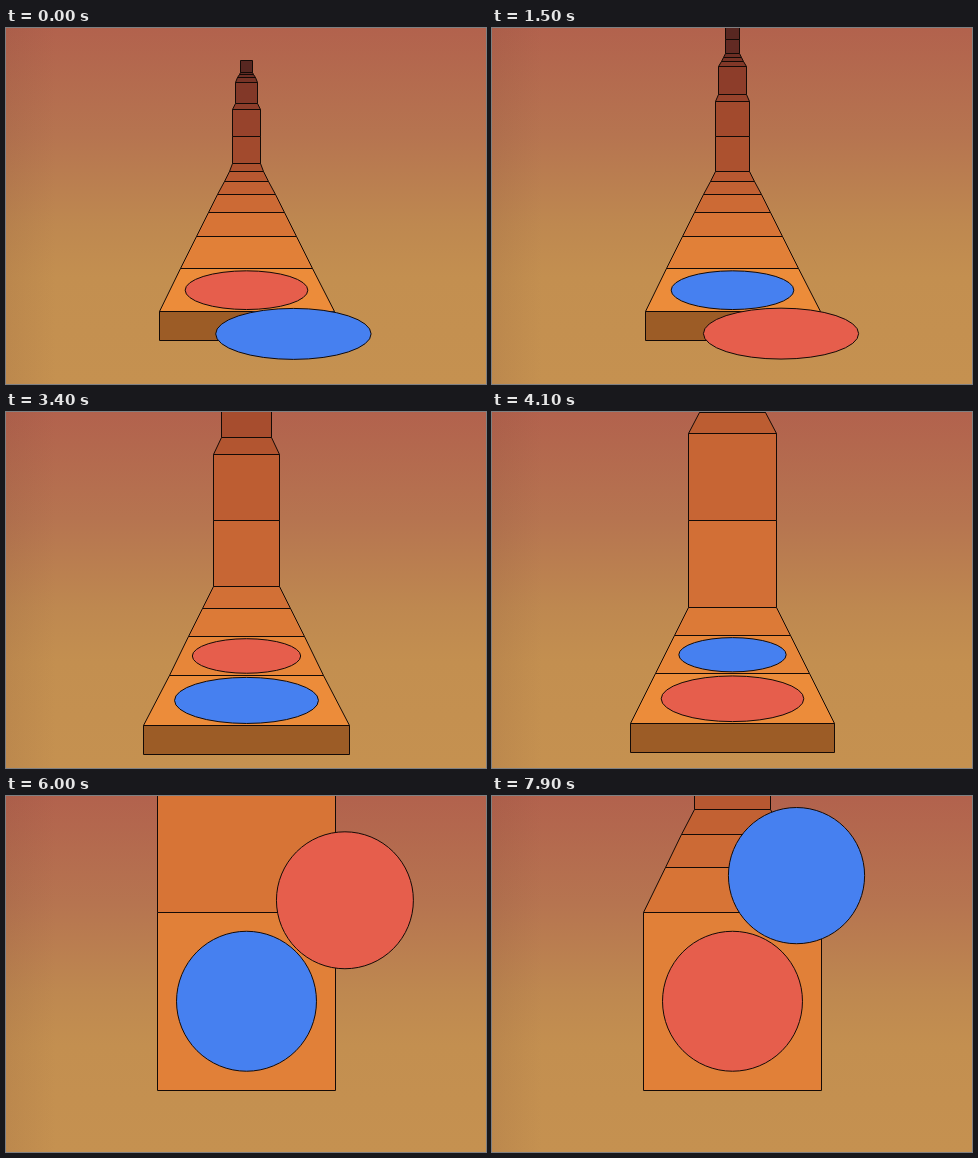
An HTML page with a canvas for the animation above (8000 ms loop, 480 by 356 pixels).

```html
<!DOCTYPE html>
<html lang="en">
<head>
<meta charset="utf-8">
<title>Orbit Tower</title>
<style>
html, body { margin: 0; width: 100%; height: 100%; overflow: hidden; background: #c49150; }
canvas { display: block; }
</style>
</head>
<body>
<canvas id="stage" width="480" height="356"></canvas>
<script>
const ctx = document.getElementById('stage').getContext('2d');
const W = 480, H = 356, CX = 240.5, LOOP = 8000, STEP = 100;
const PATH = 'FFFFFFFWWFWFFFWWFF';           // F: floor tile, W: wall tile
const LAND = [-353, 1147, 1847, 2519, 3240, 3950, 4816, 5516, 6060, 6622, 7260, 7960];
const MOVE = 300;                            // camera time after a landing
const START = 23;                            // orbit angle at time 0
const FLOOR = { y: 283.5, w: 175, c: 4.4 }, WALL = { y: 294.5, w: 178.5, c: 2 };
const BLOCK = 29, SHOWN = 15;
const BLUE = 'rgb(70,128,240)', RED = 'rgb(230,94,76)';

const lerp = (a, b, p) => a + (b - a) * p;
const snap = v => Math.floor(v) + 0.5;
const isWall = i => PATH[i] === 'W';
const rest = i => isWall(i) ? WALL : FLOOR;
const color = i => i % 2 ? BLUE : RED;

// Tiles get darker and redder with distance.
function shade(index, k = 1) {
  const i = Math.max(0, index);
  const rgb = [236 - 10.6 * i, 140 * Math.exp(-0.092 * i), 58 - 1.8 * i];
  return `rgb(${rgb.map(v => Math.round(v * k))})`;
}

function background() {
  const g = ctx.createLinearGradient(0, 0, 0, H);
  g.addColorStop(0, 'rgb(178,98,77)');
  g.addColorStop(0.3, 'rgb(182,116,80)');
  g.addColorStop(0.55, 'rgb(190,136,80)');
  g.addColorStop(0.7, 'rgb(195,143,80)');
  g.addColorStop(1, 'rgb(197,145,80)');
  ctx.fillStyle = g;
  ctx.fillRect(0, 0, W, H);
  const side = ctx.createLinearGradient(0, 0, 50, 0);
  side.addColorStop(0, 'rgba(110,60,50,.1)');
  side.addColorStop(1, 'rgba(110,60,50,0)');
  ctx.fillStyle = side;
  ctx.fillRect(0, 0, 50, H);
}

function paint(fill) {
  ctx.fillStyle = fill;
  ctx.fill();
  ctx.strokeStyle = '#140a06';
  ctx.lineWidth = 1;
  ctx.stroke();
}

function slab(y, w, top, topW, fill) {
  ctx.beginPath();
  ctx.moveTo(snap(CX - w / 2), snap(y));
  ctx.lineTo(snap(CX - topW / 2), snap(top));
  ctx.lineTo(snap(CX + topW / 2), snap(top));
  ctx.lineTo(snap(CX + w / 2), snap(y));
  ctx.closePath();
  paint(fill);
}

function ball(b, fill) {
  ctx.beginPath();
  ctx.ellipse(b.x, b.y, b.w / 2, b.h / 2, 0, 0, 7);
  paint(fill);
}

// Stack tiles upward from the bottom edge (y, w) of the first one.
function stack(first, y, w, c) {
  const tiles = [];
  for (let i = first; i < first + SHOWN && i < PATH.length; i++) {
    const wall = isWall(i);
    const h = wall ? w : (w - c) / 4;
    const topW = wall ? w : w - h;
    tiles[i] = { y, w, top: y - h, topW };
    y -= h;
    w = topW;
  }
  return tiles;
}

// Resting place of a ball on a tile.
function spot(i, tile) {
  const y = (tile.y + tile.top) / 2;
  if (isWall(i)) {
    const d = tile.w * 0.784;
    return { x: CX, y, w: d, h: d };
  }
  return { x: CX, y, w: tile.w * 0.701, h: (tile.y - tile.top) * 0.907 };
}

function orbit(pivot, wall, deg) {
  const a = deg * Math.PI / 180, s = Math.sin(a), c = Math.cos(a);
  if (wall) {
    const d = pivot.w * (1 + 0.03 * c);
    return { x: pivot.x + 141 * s, y: pivot.y + 141 * c, w: d, h: d };
  }
  const k = 1 + (c > 0 ? 0.29 : 0.25) * c;
  return {
    x: pivot.x + 120 * s,
    y: pivot.y + (c > 0 ? 47.5 : 38) * c,
    w: pivot.w * k,
    h: pivot.h * k * 1.04
  };
}

function draw(t) {
  let n = 0;
  while (n < LAND.length - 1 && t >= LAND[n + 1]) n++;
  const since = t - LAND[n];
  const moving = since < MOVE;
  const p = moving ? since / MOVE : 1;
  const prev = n - 1;
  const drop = moving && isWall(prev) && !isWall(n);   // wall tile falls away
  const first = moving && !drop ? prev : n;
  const dim = lerp(isWall(moving ? prev : n) ? 1 : 0, isWall(n) ? 1 : 0, p);
  const depth = i => i - (moving ? prev + p : n) + dim;

  let { y, w, c } = rest(n);
  if (drop) {
    y = lerp(WALL.y - WALL.w, FLOOR.y, p);
    w = lerp(WALL.w, FLOOR.w, p);
    c = lerp(1, FLOOR.c, p);
  } else if (moving) {
    const from = rest(prev), to = rest(n);
    const endW = isWall(prev) ? to.w : (to.w - to.c / 4) / 0.75;
    const endY = to.y + (isWall(prev) ? to.w : endW - to.w);
    y = lerp(from.y, endY, p);
    w = lerp(from.w, endW, p);
    c = lerp(from.c, to.c, p) - 9 * p * (1 - p);
  }

  background();
  const tiles = stack(first, y, w, c);
  if (drop) {
    const top = y + 148 * p;
    slab(top + WALL.w, WALL.w, top, WALL.w, shade(depth(prev)));
  }
  tiles.forEach((b, i) => {
    if (b.y > 0) slab(b.y, b.w, b.top, b.topW, shade(depth(i)));
  });
  if (!isWall(first)) slab(y + BLOCK, w, y, w, shade(depth(first), 0.66));

  const pivot = spot(n, tiles[n]);
  let other;
  if (drop) {
    const width = 181 - 22 * p;
    other = {
      x: CX + 24 * Math.sin(Math.PI * p),
      y: pivot.y + 47.5 + 63.5 * (1 - p ** 1.65),
      w: width,
      h: width * 0.337
    };
  } else if (moving) {
    other = spot(prev, tiles[prev]);
  } else {
    const deg = n === 0
      ? lerp(START, 540, t / LAND[1])
      : 180 * (since - MOVE) / (LAND[n + 1] - LAND[n] - MOVE);
    other = orbit(pivot, isWall(n), deg);
  }
  ball(pivot, color(n));
  ball(other, color(n + 1));
}

const began = performance.now();
function tick(now) {
  const t = Math.max(0, now - began) % LOOP;
  draw(Math.floor(t / STEP) * STEP);
  requestAnimationFrame(tick);
}
draw(0);
requestAnimationFrame(tick);
</script>
</body>
</html>
```
